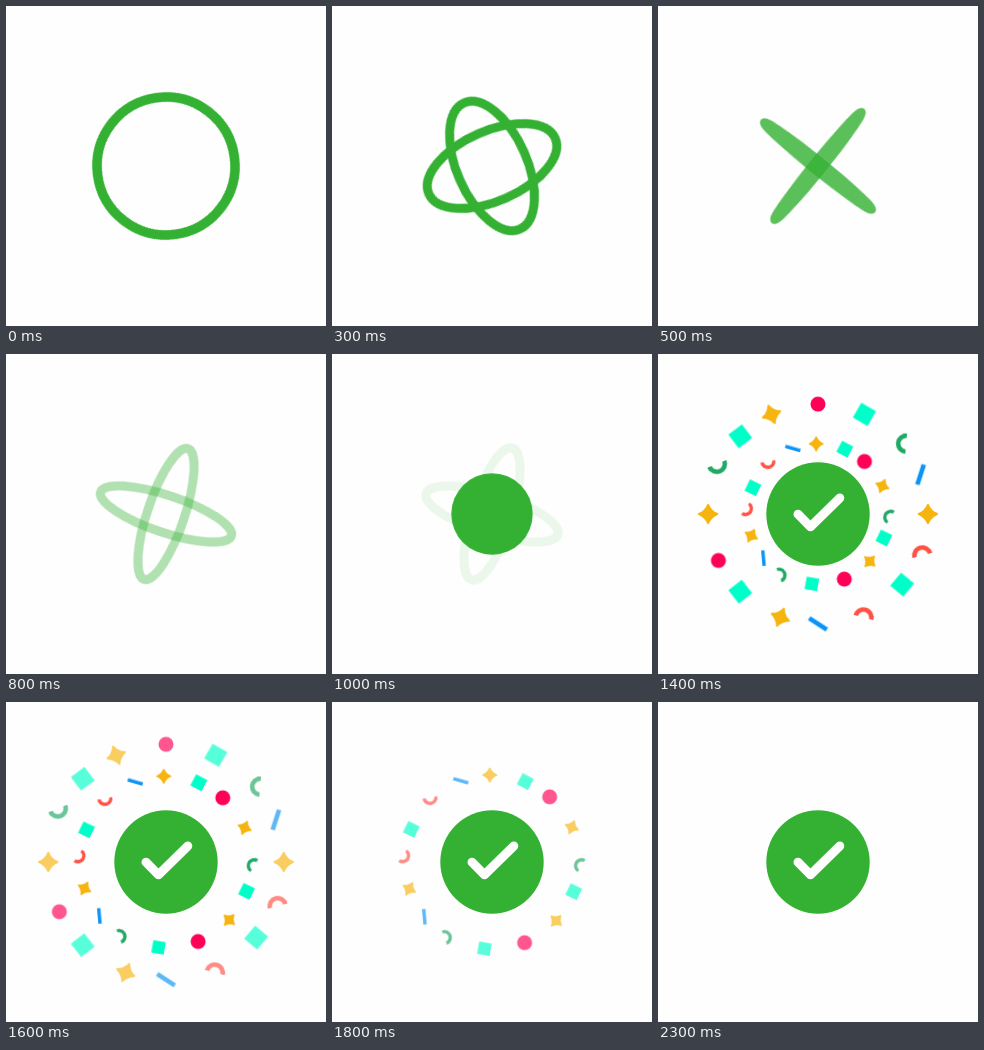
An HTML page that plays this animation: 320 px wide and 320 px high, repeating every 2.4 s.

```html
<!DOCTYPE html>
<html lang="en">
<head>
<meta charset="utf-8">
<title>Success check</title>
<style>
  html, body { margin: 0; width: 100%; height: 100%; overflow: hidden; background: #fefefe; }
  svg { display: block; width: 100vw; height: 100vh; }

  :root { --green: #34b133; }
  svg * { animation: 2400ms linear infinite; }

  /* Two rings tip over while they turn */
  .ring { fill: none; stroke: var(--green); stroke-width: 9; animation-name: tip, fade-ring; }
  .turn { animation-name: turn; }
  @keyframes tip {
    0% { ry: 69px; }
    4.167% { ry: 63.8px; }
    8.333% { ry: 51px; }
    12.5% { ry: 35.1px; }
    16.667% { ry: 19px; }
    20.833% { ry: 4.5px; }
    22.5% { ry: .2px; }
    25% { ry: 6.1px; }
    29.167% { ry: 14px; }
    33.333% { ry: 18.5px; }
    37.5%, 100% { ry: 20.2px; }
  }
  @keyframes turn {
    0% { transform: rotate(127.8deg); animation-timing-function: cubic-bezier(.3333, .6667, .6667, 1); }
    37.5%, 100% { transform: rotate(17.2deg); }
  }
  @keyframes fade-ring {
    0%, 15.5% { opacity: 1; }
    44.5%, 100% { opacity: 0; }
  }

  /* Badge */
  .disc { fill: var(--green); animation-name: grow; }
  @keyframes grow {
    0%, 36.667% { transform: scale(0); animation-timing-function: cubic-bezier(.3333, 1, .6667, 1); }
    49.167%, 100% { transform: scale(1); }
  }
  .check {
    fill: none; stroke: #fff; stroke-width: 9; stroke-linecap: round; stroke-linejoin: round;
    stroke-dasharray: 1 2; animation-name: draw;
  }
  @keyframes draw {
    0%, 43.74% { opacity: 0; stroke-dashoffset: 1; }
    43.75% { opacity: 1; stroke-dashoffset: 1; animation-timing-function: cubic-bezier(.3333, .6667, .6667, 1); }
    54.167%, 100% { opacity: 1; stroke-dashoffset: 0; }
  }

  /* Confetti */
  #far { --reach: 118px; animation-name: show-far; }
  #near { --reach: 87px; animation-name: show-near; }
  #far > g { animation-name: fly-far; }
  #near > g { animation-name: fly-near; }
  @keyframes fly-far {
    0%, 40.417% { transform: rotate(var(--a)) translateX(0px); animation-timing-function: cubic-bezier(.3333, 1, .6667, 1); }
    70.833%, 100% { transform: rotate(var(--a)) translateX(var(--reach)); }
  }
  @keyframes fly-near {
    0%, 47.833% { transform: rotate(var(--a)) translateX(0px); animation-timing-function: cubic-bezier(.3333, 1, .6667, 1); }
    72.833%, 100% { transform: rotate(var(--a)) translateX(var(--reach)); }
  }
  @keyframes show-far {
    0%, 40.41% { opacity: 0; }
    40.417%, 62.5% { opacity: 1; }
    75%, 100% { opacity: 0; }
  }
  @keyframes show-near {
    0%, 47.82% { opacity: 0; }
    47.833%, 70.833% { opacity: 1; }
    83.333%, 100% { opacity: 0; }
  }
</style>
</head>
<body>
<svg viewBox="0 0 320 320">
  <g transform="translate(160 160)">
    <g class="turn">
      <ellipse class="ring" rx="69" ry="69"/>
      <g transform="rotate(90)"><ellipse class="ring" rx="69" ry="69"/></g>
    </g>
    <g id="far"></g>
    <g id="near"></g>
    <circle class="disc" r="51.7"/>
    <path class="check" pathLength="1" d="M-20 .2L-7.5 12.8L21.8-16"/>
  </g>
</svg>
<script>
  const NS = 'http://www.w3.org/2000/svg';
  const arc = 'M-4-8A8 8 0 0 1-4 8';
  const shapes = {
    dot: { d: 'M-7.5 0a7.5 7.5 0 1 0 15 0a7.5 7.5 0 1 0-15 0', fill: '#ff0058' },
    square: { d: 'M-8.5-8.5h17v17h-17z', fill: '#00ffc8' },
    star: {
      d: 'M0-9.2Q2.6-2.6 9.2 0Q2.6 2.6 0 9.2Q-2.6 2.6-9.2 0Q-2.6-2.6 0-9.2z',
      fill: '#f6b40e', stroke: '#f6b40e', 'stroke-width': 2, 'stroke-linejoin': 'round'
    },
    bar: { d: 'M-10.5-2.3h21v4.6h-21z', fill: '#0b94f5' },
    leaf: { d: arc, fill: 'none', stroke: '#20a865', 'stroke-width': 4.6 },
    coral: { d: arc, fill: 'none', stroke: '#ff5145', 'stroke-width': 4.6 }
  };

  // Each piece: shape, direction from the centre, own tilt (degrees)
  const far = [
    ['dot', -90, 0], ['square', -65, 30], ['leaf', -40, 185], ['bar', -21, 108],
    ['star', 0, 0], ['coral', 20, -105], ['square', 40, 40], ['coral', 65, -75],
    ['bar', 90, 33], ['star', 110, 22], ['square', 135, 52], ['dot', 155, 0],
    ['star', 180, 0], ['leaf', 205, 68], ['square', 225, -37], ['star', 245, -20]
  ];
  const near = [
    ['star', -91.5, 0], ['square', -67.5, 28], ['dot', -48.5, 0], ['star', -23.5, 22],
    ['leaf', 1.4, 212], ['square', 20, 26], ['star', 42.5, 42], ['dot', 68, 0],
    ['square', 95, 10], ['leaf', 121, -20], ['bar', 141, 85], ['star', 162, 28],
    ['coral', 183, 35], ['square', 202, 26], ['coral', 225, 80], ['bar', 249, 16]
  ];

  function add(parent, tag, attrs) {
    const el = document.createElementNS(NS, tag);
    for (const key in attrs) el.setAttribute(key, attrs[key]);
    return parent.appendChild(el);
  }

  function scatter(id, pieces, size) {
    const group = document.getElementById(id);
    for (const [kind, angle, tilt] of pieces) {
      const piece = add(group, 'g', { style: `--a:${angle}deg` });
      const k = kind === 'dot' ? 1 : size;
      add(piece, 'path', { ...shapes[kind], transform: `rotate(${tilt - angle}) scale(${k})` });
    }
  }

  scatter('far', far, 1);
  scatter('near', near, 0.74);
</script>
</body>
</html>
```
